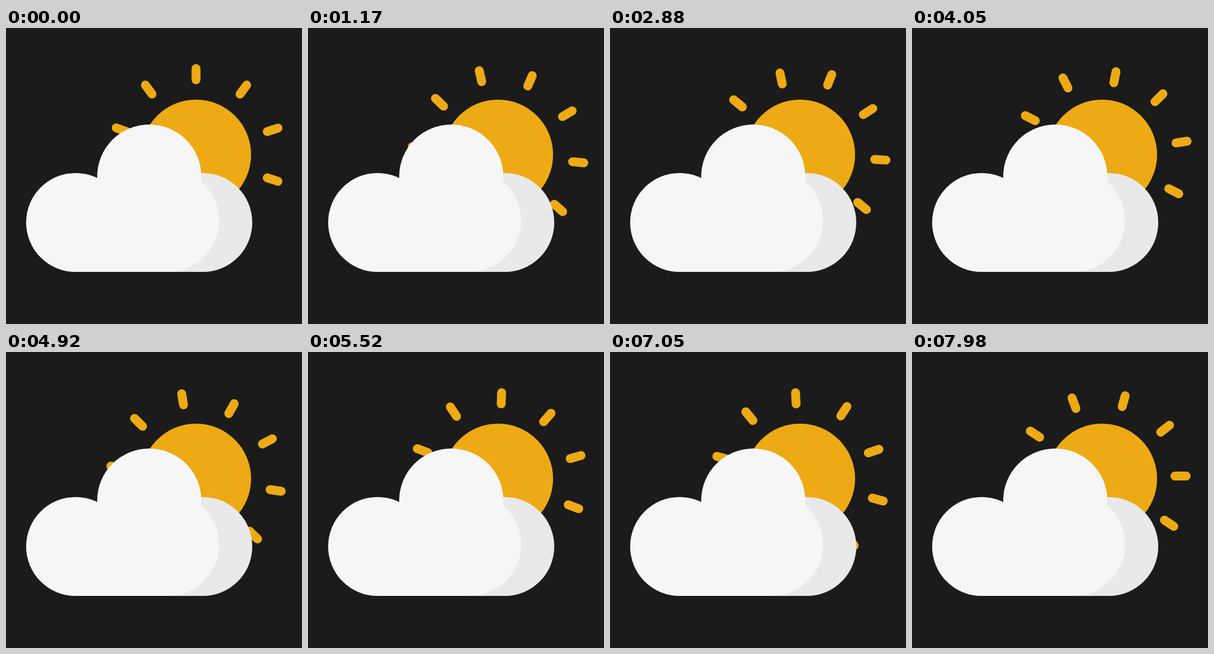
An HTML page for the animation above (8000 ms loop, 500 by 500 pixels).

```html
<!DOCTYPE html>
<html lang="en">
<head>
<meta charset="utf-8">
<title>Partly cloudy</title>
<style>
  html, body { margin: 0; width: 100%; height: 100%; overflow: hidden; background: #1b1b1b; }
  svg { display: block; width: 100%; height: 100%; }
</style>
</head>
<body>
<svg viewBox="0 0 500 500">
  <g transform="translate(321 214)" fill="#edaa15">
    <g id="rays" stroke="#edaa15" stroke-width="15" stroke-linecap="round"></g>
    <circle r="93"/>
  </g>
  <g fill="#e9e9e9">
    <circle cx="332.5" cy="328.5" r="83.5"/>
    <rect x="240" y="328" width="92.5" height="84"/>
  </g>
  <g fill="#f6f6f6">
    <circle cx="117.5" cy="328.5" r="83.5"/>
    <circle cx="242" cy="251" r="88"/>
    <circle cx="273" cy="325" r="87"/>
    <rect x="117.5" y="328" width="155.5" height="84"/>
  </g>
</svg>
<script>
  const LOOP = 8000, STEP = 30, DEGREES_PER_MS = 0.02;
  const RAY_COUNT = 10, UNEVEN_RAY = 8;
  const rays = document.getElementById('rays');

  function addRay(angle, radius, tilt) {
    const line = document.createElementNS('http://www.w3.org/2000/svg', 'line');
    line.setAttribute('y1', -9.5);
    line.setAttribute('y2', 9.5);
    line.setAttribute('transform', `rotate(${angle}) translate(0 ${-radius}) rotate(${tilt})`);
    rays.append(line);
  }

  // One ray sits slightly closer to the sun and leans a little.
  for (let i = 0; i < RAY_COUNT; i++) {
    const angle = i * 360 / RAY_COUNT;
    if (i === UNEVEN_RAY) addRay(angle + 0.45, 132.7, 2);
    else addRay(angle, 136, 0);
  }

  const start = performance.now();
  function draw() {
    const time = (performance.now() - start) % LOOP;
    const stepped = Math.floor(time / STEP) * STEP;
    rays.setAttribute('transform', `rotate(${stepped * DEGREES_PER_MS})`);
    requestAnimationFrame(draw);
  }
  draw();
</script>
</body>
</html>
```
